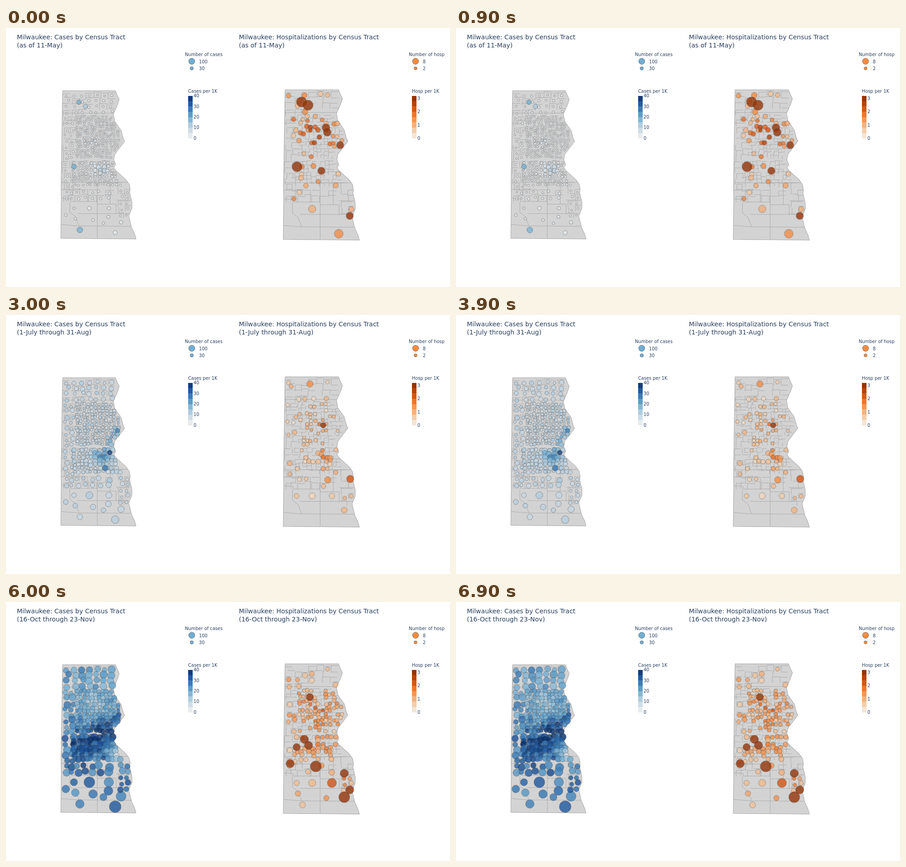
Write an HTML page that moves like this. It is 980 by 572 pixels and loops after 7.5 s.

```html
<!DOCTYPE html>
<html lang="en">
<head>
<meta charset="utf-8">
<title>Cases and hospitalizations by census tract</title>
<style>
html, body { margin: 0; width: 100%; height: 100%; overflow: hidden; background: #fff; }
svg { display: block; width: 980px; height: 572px; }
text { font: 9.85px "DejaVu Sans", Verdana, sans-serif; fill: #2a3f5f; }
.title { font-size: 14px; }
.land { fill: #d3d3d3; stroke: #a6a6a6; }
.lines { fill: none; stroke: #a9a9a9; stroke-width: .9; }
circle { stroke: #444; stroke-width: .6; }
.period circle { opacity: .78; }
.period { opacity: 0; animation: show 7.5s step-end infinite; }
@keyframes show { 0% { opacity: 1; } 20%, 100% { opacity: 0; } }
</style>
</head>
<body>
<svg id="stage" viewBox="0 0 980 572" xmlns="http://www.w3.org/2000/svg"></svg>
<script>
const STEP = 1.5;
const PERIODS = ["as of 11-May", "12-May through 31-June", "1-July through 31-Aug",
  "1-Sep through 15-Oct", "16-Oct through 23-Nov"];
const BLUES = ["#f4f4f4", "#dfe6ec", "#c3d5e3", "#a2c7de", "#70add3", "#4d92c4", "#2b6fb0", "#17509a", "#08306b"];
const ORANGES = ["#f7f2ee", "#f2dcc6", "#f3c499", "#f4a66c", "#f58c42", "#e7681f", "#cc4c0c", "#ac3b07", "#8c2d04"];

// Eastern shore from north to south
const SHORE = [[241.5, 138.5], [245, 147], [250, 158], [246, 170], [237, 190], [240, 206], [254, 226],
  [259, 245], [262, 250], [250, 266], [240, 279], [238, 291], [242, 302], [238, 308], [243, 315], [265, 335],
  [272, 345], [274, 356], [273, 364], [278, 385], [278, 398], [271, 415], [277, 440], [284, 455], [287, 466]];
const COAST = `M125 138.5L${SHORE.join(" ")} 121 464.5 122 376 121.5 345 124 190Z`;
const ROADS = "M121 434L158 437 277 438M201.5 342V464M141 384V407L153 416 161 437" +
  "M121 376L142 377 143 383 201 383 202 389H243V412M158 410H272M121 357H180V384M123 341H270" +
  "M230 343V389M243 380H276M124 188H237M123 211H150";
const RIGHT_MAP = "translate(612 136.3) scale(1.012 1.0136) translate(-121 -138.3)";

// Areas of evenly spread tracts, from the suburbs to the dense centre
const AREAS = [
  { x: [136, 240], y: [149, 188], dx: 16, dy: 12.5, size: 6.8 },
  { x: [133, 147], y: [200, 376], dx: 13, dy: 12.5, size: 6.4 },
  { x: [157, 254], y: [197, 286], dx: 8.2, dy: 7.3, size: 4.8 },
  { x: [151, 250], y: [298, 351], dx: 9.2, dy: 8, size: 6.4 },
  { x: [157, 232], y: [363, 378], dx: 17, dy: 13, size: 8 },
  { x: [255, 268], y: [350, 414], dx: 12, dy: 12.5, size: 6.3 }];
// Wide southern tracts: x, y, size
const RURAL = [[150, 398, 8], [132, 413, 8.5], [153, 421, 8.5], [163, 446, 9.5], [184, 398, 12],
  [192, 424, 9.5], [226, 417, 10], [215, 431, 8], [227, 398, 10.5], [254, 429, 11], [241, 452, 13]];

// hot: x, y, spread, then what its middle adds to scale, rate and share
// key: x, y, radius, rate of tracts that stand out
const CASES = [
  { scale: .36, rate: 4, hot: [[210, 309, 12, .4, 7], [190, 252, 10, .3, 3]],
    key: [[161, 164, 5, 20], [175, 173, 5, 14], [150, 306, 5.5, 20], [163, 446, 6.5, 19]] },
  { scale: .43, rate: 5, hot: [[211, 307, 14, .8, 32], [186, 322, 14, .15, 6], [172, 213, 12, .2, 3]],
    key: [[175, 173, 4.6, 14], [219, 338, 6, 23]] },
  { scale: .65, rate: 11, hot: [[212, 312, 13, .3, 14], [234, 280, 10, .4, 13], [246, 254, 7, .4, 12]],
    key: [[229, 304, 5.5, 38], [219, 338, 6.3, 29]] },
  { scale: .52, rate: 7, hot: [[212, 312, 14, .4, 14], [232, 282, 9, .4, 13], [249, 248, 6, .9, 36]],
    key: [[212, 279, 6, 38], [218, 328, 7, 27]] },
  { scale: 1, rate: 24, hot: [[195, 225, 25, 0, -8], [165, 312, 34, .1, 10], [218, 284, 17, .35, 16],
    [210, 420, 55, 0, 10], [242, 337, 9, -.2, -18], [248, 256, 8, .4, 14]], key: [] }];

const HOSP = [
  { share: .12, scale: .53, rate: 1.2, hot: [[194, 238, 24, .06, .9, .22], [165, 185, 25, 0, .3, .3]],
    key: [[161, 165, 11, 3.1], [175, 172, 11, 3.1], [151, 306, 11, 3.1], [242, 452, 9.5, 1.6], [266, 413, 8, 3.1],
      [184, 398, 8, 1.1], [214, 221, 8.5, 3.1], [217, 231, 8.5, 3.1], [245, 259, 8, 3.1], [204, 315, 8, 3.1]] },
  { share: .14, scale: .34, rate: .5, hot: [[190, 238, 25, .08, .4, .06]],
    key: [[205, 300, 7, 3.1], [218, 305, 10, 3.1], [217, 317, 7.5, 3.1], [192, 337, 6.5, 1.6], [184, 398, 6, .8]] },
  { share: .25, scale: .43, rate: .75, hot: [[209, 313, 15, .07, .8, .3], [202, 248, 12, 0, .8, .1]],
    key: [[208, 244, 6, 3.1], [267, 361, 8, 2.3], [218, 363, 7, 1.6], [179, 154, 7, 1.6]] },
  { share: .28, scale: .38, rate: .65, hot: [[212, 310, 12, .13, 1.1, .3], [205, 243, 18, 0, .4, .15]],
    key: [[266, 413, 7, 3.1], [254, 429, 7, 1.1], [223, 268, 4.5, 2.3]] },
  { share: .42, scale: .48, rate: 1.1, hot: [[204, 240, 23, 0, .6, .35], [212, 312, 15, 0, .5, .25], [257, 395, 20, 0, .7, .4]],
    key: [[192, 362, 12, 3.1], [254, 429, 12, 3.1], [266, 413, 9, 3.1], [227, 398, 10, 2.3], [136, 356, 9, 3.1],
      [167, 303, 9, 3.1], [176, 316, 9, 3.1], [150, 320, 8, 3.1], [254, 377, 9, 3.1], [179, 211, 8, 3.1]] }];

let seed = 7;
const rand = () => (seed = (seed * 16807) % 2147483647) / 2147483647;
const vary = (value, amount) => value * (1 + (rand() - .5) * amount);

function shoreAt(y) {
  const i = SHORE.findIndex(p => p[1] > y);
  const [x0, y0] = SHORE[i - 1], [x1, y1] = SHORE[i];
  return x0 + (x1 - x0) * (y - y0) / (y1 - y0);
}

function fill({ x: [west, east], y: [top, bottom], dx, dy, size }) {
  const tracts = [];
  for (let y = top; y <= bottom; y += dy)
    for (let x = west; x <= east; x += dx) {
      const at = { x: x + (rand() - .5) * dx * .45, y: y + (rand() - .5) * dy * .45, size: vary(size, .5), dx, dy };
      if (at.x < shoreAt(at.y) - 4) tracts.push(at);
    }
  return tracts;
}

const blocks = AREAS.flatMap(fill);
const tracts = [...RURAL.map(([x, y, size]) => ({ x, y, size })), ...blocks];

// Partial cell edges give the irregular tract borders
const borders = blocks.map(({ x, y, dx, dy }) => {
  const corner = `M${(x - dx / 2).toFixed(1)} ${(y - dy / 2).toFixed(1)}`;
  return (rand() < .75 ? `${corner}h${dx}` : "") + (rand() < .65 ? `${corner}v${dy}` : "");
}).join("");

function mix(a, b, t) {
  const part = (color, i) => parseInt(color.slice(i, i + 2), 16);
  return `rgb(${[1, 3, 5].map(i => Math.round(part(a, i) + (part(b, i) - part(a, i)) * t))})`;
}
function shade(colors, share) {
  const at = Math.max(0, Math.min(.999, share)) * (colors.length - 1), i = Math.floor(at);
  return mix(colors[i], colors[i + 1], at - i);
}
const dot = (x, y, r, color) =>
  `<circle cx="${x.toFixed(1)}" cy="${y.toFixed(1)}" r="${r.toFixed(1)}" fill="${color}"/>`;
const label = (x, y, words, cls = "") => `<text class="${cls}" x="${x}" y="${y}">${words}</text>`;

// grow lifts small tracts; noise is the spread of the rates
function dots({ share = 1, scale, rate, hot, key }, { colors, max, grow, noise }) {
  const spread = tracts.map(({ x, y, size }) => {
    let chance = share, k = scale, v = rate;
    for (const [hx, hy, reach, addScale, addRate, addShare = 0] of hot) {
      const g = Math.exp(-((x - hx) ** 2 + (y - hy) ** 2) / (2 * reach * reach));
      k += addScale * g;
      v += addRate * g;
      chance += addShare * g;
    }
    if (rand() > chance || key.some(p => Math.hypot(p[0] - x, p[1] - y) < 5)) return "";
    return dot(x, y, Math.max(2, (size + grow) * k), shade(colors, vary(v, noise) / max));
  });
  return spread.join("") + key.map(([x, y, r, v]) => dot(x, y, r, shade(colors, v / max))).join("");
}

function legend(x, { colors, max, name, unit, counts, ticks }) {
  const sizes = counts.map((n, i) => {
    const y = 73.5 + i * 15.7;
    return dot(x + 15, y, 6.8 * Math.sqrt(n / counts[0]), colors[4]) + label(x + 31, y + 4, n);
  }).join("");
  const bar = colors.slice(1).map((c, i) =>
    `<rect x="${x + 7}" y="${150 + (7 - i) * 11.7}" width="10" height="11.9" fill="${mix(colors[i], c, .6)}"/>`).join("");
  const marks = ticks.map(t => label(x + 19, 246.8 - t / max * 93.6, t)).join("");
  return label(x, 62, name) + sizes + label(x + 7, 143, unit) + bar + marks;
}

const caseStyle = { colors: BLUES, max: 40, grow: 0, noise: .45,
  name: "Number of cases", unit: "Cases per 1K", counts: [100, 30], ticks: [0, 10, 20, 30, 40] };
const hospStyle = { colors: ORANGES, max: 3.2, grow: 4, noise: .9,
  name: "Number of hosp", unit: "Hosp per 1K", counts: [8, 2], ticks: [0, 1, 2, 3] };

const map = `<path class="land" d="${COAST}"/><path class="lines" clip-path="url(#coast)" d="${ROADS + borders}"/>`;
const onRight = content => `<g transform="${RIGHT_MAP}">${content}</g>`;
const periods = PERIODS.map((name, i) =>
  `<g class="period" style="animation-delay:${(i - PERIODS.length) * STEP}s">` +
  [24, 514].map(x => label(x, 42.5, `(${name})`, "title")).join("") +
  dots(CASES[i], caseStyle) + onRight(dots(HOSP[i], hospStyle)) + "</g>").join("");

document.getElementById("stage").innerHTML =
  `<defs><clipPath id="coast"><path d="${COAST}"/></clipPath></defs>` + map + onRight(map) +
  label(24, 24.5, "Milwaukee: Cases by Census Tract", "title") +
  label(514, 24.5, "Milwaukee: Hospitalizations by Census Tract", "title") +
  legend(395, caseStyle) + legend(889, hospStyle) + periods;
</script>
</body>
</html>
```
